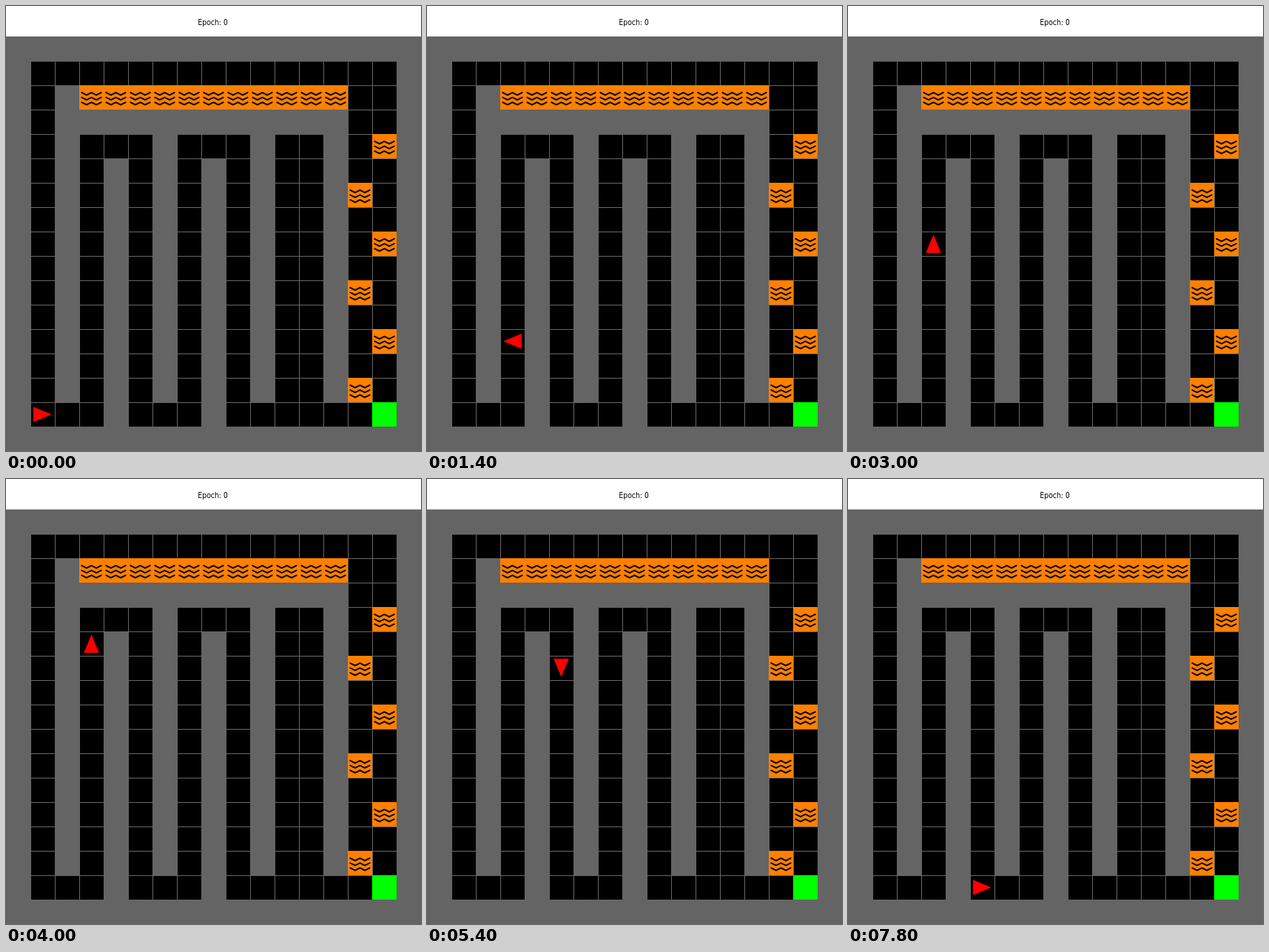
These frames come from a looping animation (544 by 584 pixels, 8000 ms). An HTML page:

```html
<!DOCTYPE html>
<html lang="en">
<head>
<meta charset="utf-8">
<title>Grid world</title>
<style>
  html, body { margin: 0; width: 100%; height: 100%; overflow: hidden; background: #fff; }
  svg { display: block; }
  text { font: 10px "DejaVu Sans Condensed", "Noto Sans", sans-serif; text-anchor: middle; }
</style>
</head>
<body>
<svg width="544" height="584" viewBox="0 0 544 584">
  <defs>
    <g id="floor">
      <path fill="#646464" d="M0 0h32v32h-32z"/>
      <path d="M1 1h31v31h-31z"/>
    </g>
    <path id="wave" d="M3.2 9.6l6.4 3.2 6.4-3.2 6.4 3.2 6.4-3.2" fill="none" stroke="#000" stroke-width="1.92" stroke-linecap="round" stroke-linejoin="round"/>
    <g id="lava">
      <path fill="#ff8000" d="M0 0h32v32h-32z"/>
      <use href="#wave"/>
      <use href="#wave" y="6.4"/>
      <use href="#wave" y="12.8"/>
    </g>
    <path id="goal" fill="#0f0" d="M0 0h32v32h-32z"/>
  </defs>
  <text x="271.2" y="25">Epoch: 0</text>
  <path fill="#646464" d="M0 40h544v544h-544z"/>
  <g id="maze" transform="translate(0 40)"></g>
  <path id="agent" fill="#f00" d="M-12.16-9.92L11.84 0-12.16 9.92z"/>
</svg>
<script>
const TILE = 32, TOP = 40, STEP = 200;
const kinds = { '.': 'floor', '~': 'lava', 'G': 'goal' };

const corridor = '#.#.#.#.#.#..#..#';
const maze = [
  '#################',
  '#...............#',
  '#.#~~~~~~~~~~~..#',
  '#.############..#',
  '#.#...#...#..#.~#',
  ...Array(10).fill(corridor),
  '#...#...#......G#',
  '#################'
].map(row => [...row]);

// Lava alternates between the two right-hand columns.
for (let row = 6; row <= 14; row += 2) maze[row][row % 4 ? 14 : 15] = '~';

document.getElementById('maze').innerHTML = maze.map((row, y) =>
  row.map((cell, x) => kinds[cell]
    ? `<use href="#${kinds[cell]}" x="${x * TILE}" y="${y * TILE}"/>` : '').join('')
).join('');

// F: forward, L / R: turn, -: bump into a wall
const actions = 'FFLFFFL-' + 'RFFLRF' + 'FFFLRF' + 'FRFFRF' + 'FFFFFL' + 'RFFFFF' + 'L';
const headings = [[1, 0], [0, 1], [-1, 0], [0, -1]];
let x = 1, y = 15, heading = 0;

const pose = () => `translate(${(x + 0.5) * TILE}px, ${TOP + (y + 0.5) * TILE}px) rotate(${heading * 90}deg)`;

const poses = [pose()];
for (const action of actions) {
  if (action === 'F') {
    x += headings[heading][0];
    y += headings[heading][1];
  } else if (action === 'L') {
    heading = (heading + 3) % 4;
  } else if (action === 'R') {
    heading = (heading + 1) % 4;
  }
  poses.push(pose());
}

const count = poses.length;
const frames = poses.map((transform, i) => ({ transform, offset: i / count, easing: 'step-end' }));
frames.push({ transform: poses[count - 1], offset: 1 });
document.getElementById('agent').animate(frames, { duration: count * STEP, iterations: Infinity });
</script>
</body>
</html>
```
